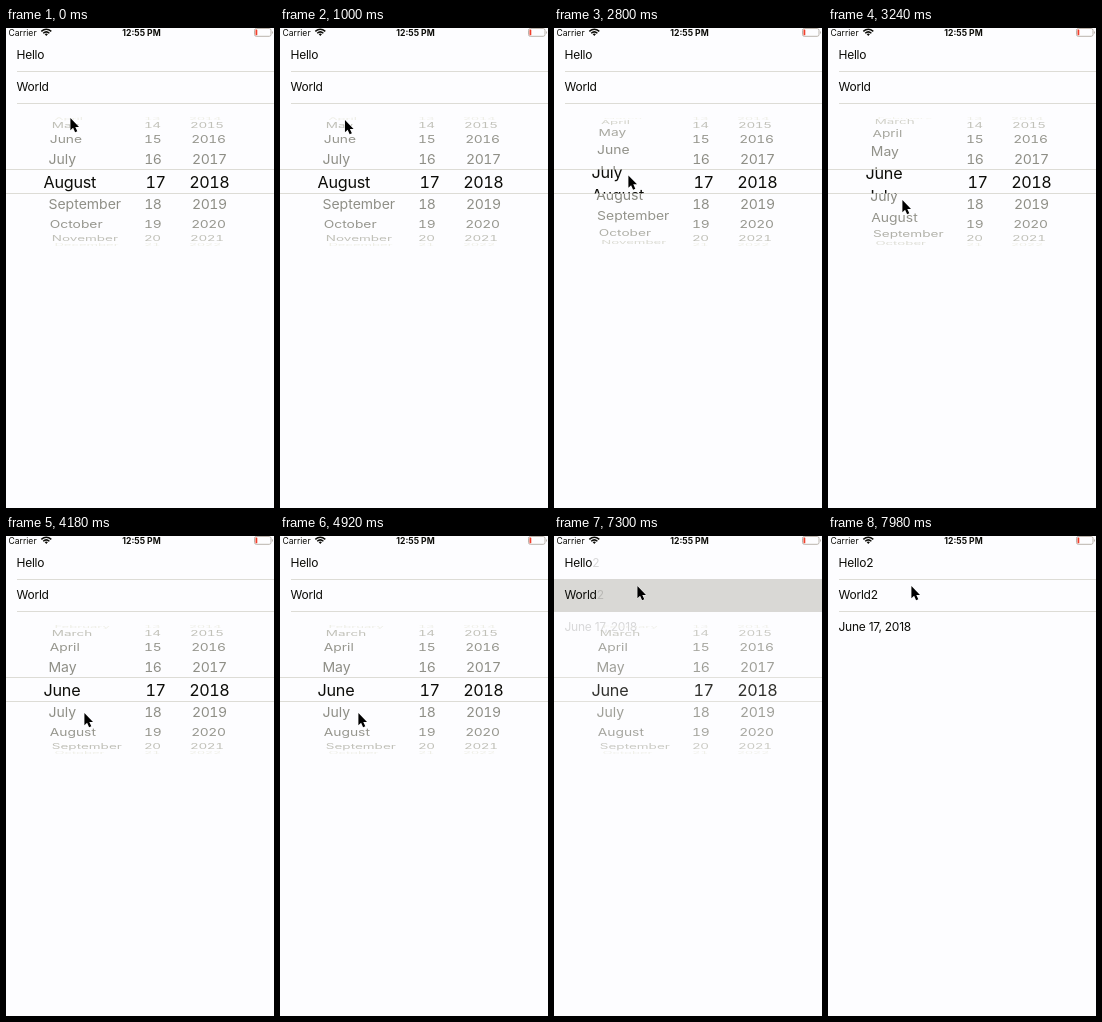
An HTML page for the animation above (8000 ms loop, 268x480 px).

```html
<!DOCTYPE html>
<html lang="en">
<head>
<meta charset="utf-8">
<title>Date picker</title>
<style>
  html, body { margin: 0; width: 100%; height: 100%; overflow: hidden; background: #fdfdff; }
  svg { display: block; width: 100%; height: 100%; }
  text { font-family: Inter, Roboto, sans-serif; fill: #0c0c08; }
  .row { font-size: 12px; letter-spacing: -.02em; }
  .status { font-size: 8.6px; }
  .wheel, .lens { letter-spacing: -.03em; font-variant-numeric: tabular-nums; }
  .wheel { font-size: 14.1px; }
  .lens { font-size: 16.2px; }
  .wheel .month { letter-spacing: 0; }
  .lens .month { letter-spacing: -.015em; }
  .rule { stroke: #dddcd6; }
</style>
</head>
<body>
<svg viewBox="0 0 268 480">
  <defs>
    <clipPath id="band"><rect y="141.5" width="268" height="24"/></clipPath>
    <clipPath id="sides"><path d="M0 88H268V141H0ZM0 166H268V218H0Z"/></clipPath>
  </defs>

  <text class="status" x="2.5" y="7.6">Carrier</text>
  <g fill="none" stroke="#0c0c08" stroke-width="1.5">
    <path d="M35.3 3.4Q40.3 -.9 45.3 3.4M37.2 5.2Q40.3 2.6 43.4 5.2"/>
    <path d="M38.6 6.1Q40.3 4.8 42 6.1L40.3 7.9Z" fill="#0c0c08" stroke="none"/>
  </g>
  <text class="status" x="135.5" y="7.6" text-anchor="middle" font-weight="700">12:55 PM</text>
  <rect x="248.5" y=".5" width="16.5" height="7.8" rx="1.8" fill="none" stroke="#b4aca4" stroke-width=".9"/>
  <path d="M266 2.9Q268 4.4 266 5.9Z" fill="#b4aca4"/>
  <rect x="249.5" y="1.5" width="1.8" height="5.8" rx=".6" fill="#f0402c"/>

  <path class="rule" d="M11 43.5H268M11 75.5H268"/>
  <rect id="highlight" y="43" width="268" height="33" fill="#d9d8d5"/>
  <text class="row" x="10.5" y="31.4">Hello<tspan class="fresh">2</tspan></text>
  <text class="row" x="10.5" y="63.4">World<tspan class="fresh">2</tspan></text>
  <text class="row fresh" x="10.5" y="95.4">June 17, 2018</text>

  <g id="picker">
    <path class="rule" d="M0 141.5H268M0 165.5H268"/>
    <g id="wheel" class="wheel" clip-path="url(#sides)"></g>
    <g id="lens" class="lens" clip-path="url(#band)"></g>
  </g>

  <path id="cursor" d="M.4 0V12.2L3.1 9.7L5.1 14.3L7.3 13.3L5.3 8.9H9Z"
        stroke="#fff" stroke-width="1" paint-order="stroke"/>
</svg>
<script>
const LOOP = 8000, MID = 153.7, CENTER_X = 134;
const RADIUS = 69.5, STEP = 19.2 * Math.PI / 180, ROW = 23;
const DRAG_START = 126, SLOP = 8.5, RELEASE = 3420, SETTLED = 3800;
const MONTHS = ['January', 'February', 'March', 'April', 'May', 'June', 'July',
  'August', 'September', 'October', 'November', 'December'];
// Time, x and y of the pointer tip
const POINTER = [
  [0, 64, 90], [900, 64, 90], [1600, 74, 126], [2400, 74, 126], [3240, 74, 172],
  [RELEASE, 78, 177], [5100, 78, 177], [5950, 96, 78], [6350, 96, 78], [6850, 83, 50], [LOOP, 83, 50]
];
// Grey of the wheel text by distance from the middle row
const GREYS = [130, 142, 150, 192, 238, 250];

const $ = id => document.getElementById(id);
const clamp = v => Math.min(1, Math.max(0, v));
const progress = (t, from, to) => clamp((t - from) / (to - from));
const smooth = p => p * p * (3 - 2 * p);
const mix = (a, b, p) => a + (b - a) * p;
// Slightly warm grey
const grey = v => `rgb(${v} ${v} ${v - 8})`;

function addTexts(parent, reach, className) {
  return Array.from({ length: 2 * reach + 1 }, (_, i) => {
    const node = document.createElementNS('http://www.w3.org/2000/svg', 'text');
    node.setAttribute('class', className);
    parent.append(node);
    return { node, shift: i - reach };
  });
}

function makeColumn(className, wheelX, lensX, label) {
  const wheel = addTexts($('wheel'), 5, className), lens = addTexts($('lens'), 1, className);
  return position => {
    const base = Math.round(position);
    for (const { node, shift } of wheel) {
      const d = base + shift - position, far = Math.abs(d), angle = d * STEP;
      const shown = far < 4.5;
      node.setAttribute('display', shown ? 'inline' : 'none');
      if (!shown) continue;
      const depth = 1 - .09 * (1 - Math.cos(angle));
      const x = CENTER_X + (wheelX - CENTER_X) * depth;
      const y = MID + RADIUS * Math.sin(angle) * depth;
      const level = Math.floor(far);
      node.textContent = label(base + shift);
      node.setAttribute('transform',
        `translate(${x} ${y}) scale(${depth} ${depth * Math.cos(angle)}) translate(0 5.1)`);
      node.style.fill = grey(mix(GREYS[level], GREYS[level + 1], far - level));
    }
    for (const { node, shift } of lens) {
      node.textContent = label(base + shift);
      node.setAttribute('x', lensX);
      node.setAttribute('y', MID + 5.9 + (base + shift - position) * ROW);
    }
  };
}

const setMonth = makeColumn('month', 42, 37.5, n => MONTHS[(n + 11) % 12]);
makeColumn('day', 138.2, 139.4, String)(17);
makeColumn('year', 186.3, 183.3, String)(2018);
const fresh = document.querySelectorAll('.fresh');

function pointerAt(t) {
  const i = POINTER.findIndex(k => k[0] > t);
  const a = POINTER[i - 1], b = POINTER[i];
  const p = smooth(progress(t, a[0], b[0]));
  return [mix(a[1], b[1], p), mix(a[2], b[2], p)];
}

function monthAt(t) {
  const y = pointerAt(Math.min(t, RELEASE))[1];
  const dragged = t < 2400 ? 8 : 8 - Math.max(0, y - DRAG_START - SLOP) / ROW;
  return mix(dragged, 6, smooth(progress(t, RELEASE, SETTLED)));
}

function draw(now) {
  const t = now % LOOP;
  $('cursor').setAttribute('transform', `translate(${pointerAt(t)})`);
  setMonth(monthAt(t));

  const fade = progress(t, 7240, 7640);
  $('picker').setAttribute('opacity', 1 - fade);
  $('highlight').setAttribute('opacity', t < 7090 ? 0 : 1 - progress(t, 7320, 7700));
  for (const node of fresh) node.style.fillOpacity = fade;
  requestAnimationFrame(draw);
}
draw(0);
</script>
</body>
</html>
```
